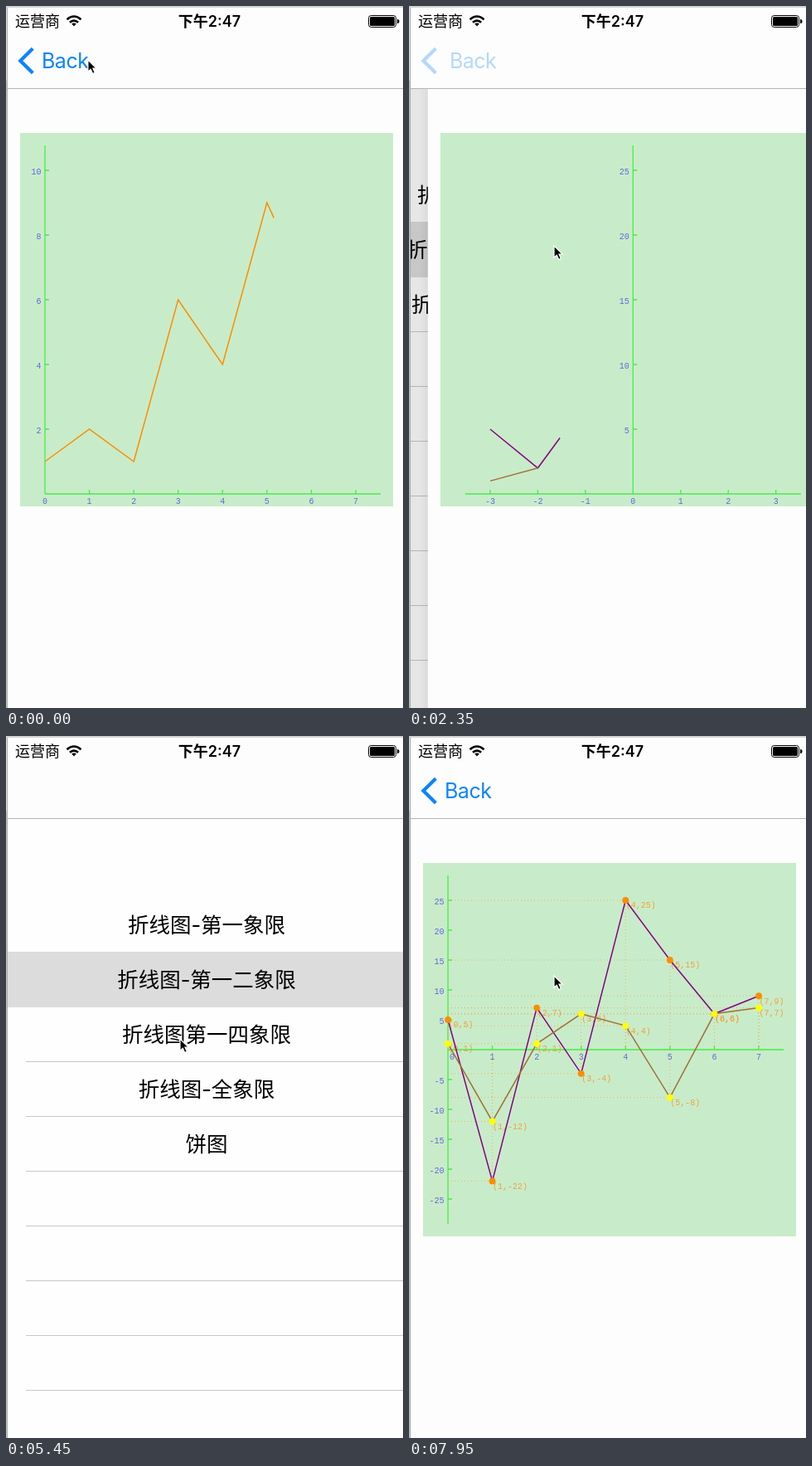
An HTML page for the animation above (8 s loop, 479x846 px).

```html
<!DOCTYPE html>
<html lang="zh-CN">
<head>
<meta charset="utf-8">
<title>Line charts</title>
<style>
html, body { margin: 0; width: 100%; height: 100%; overflow: hidden; background: #fdfdfd; }
svg { display: block; width: 100vw; height: 100vh; }
text { font-family: Inter, "Noto Sans CJK SC", "Noto Sans CJK JP", "Noto Sans CJK", sans-serif; }
.mono text { font: 10px "Liberation Mono", monospace; }
.row { font-size: 25.5px; text-anchor: middle; }
</style>
</head>
<body>
<svg id="stage" viewBox="0 0 479 846">
  <defs>
    <linearGradient id="edge"><stop offset="0" stop-opacity="0"/><stop offset="1" stop-opacity=".05"/></linearGradient>
  </defs>
  <g id="table"></g>
  <g id="page">
    <rect x="-8" y="100" width="10" height="746" fill="url(#edge)"/>
    <rect x="2" y="100" width="478" height="746" fill="#fdfdfd"/>
    <rect x="17" y="153" width="450" height="450" fill="#c8ecc9"/>
  </g>
  <rect width="479" height="99" fill="#fdfdfd"/>
  <rect x="2" y="99" width="477" height="1" fill="#b4b4b4"/>
  <g id="chevron"><path d="M32.3 51.3L17.3 66L32.3 80.7" fill="none" stroke="#0a84ff" stroke-width="4.2"/></g>
  <text id="back" x="43" y="75" font-size="25" letter-spacing="-.5" fill="#0a84ff">Back</text>
  <text x="11" y="25" font-size="18">运营商</text>
  <text x="245.5" y="25" font-size="18" font-weight="600" text-anchor="middle">下午2:47</text>
  <g fill="none" stroke="#000" stroke-width="2.6">
    <path d="M73.5 16.2Q82 8.8 90.5 16.2"/>
    <path d="M76.9 19.8Q82 15.4 87.1 19.8"/>
    <path d="M79.2 21.6Q82 19.4 84.8 21.6L82 24.6Z" fill="#000" stroke="none"/>
  </g>
  <rect x="437.5" y="11.5" width="33" height="14" rx="3" fill="none" stroke="#000"/>
  <rect x="439" y="13" width="30" height="11" rx="1.5"/>
  <path d="M472 16Q474.5 16 474.5 18.5T472 21Z"/>
  <rect width="479" height="2" fill="#d2d2d2"/>
  <rect width="2" height="90" y="2" fill="#e6e6e6"/>
  <rect x="1" y="2" width="1" height="844" fill="#a8a8a8"/>
  <rect y="90" width="1" height="756" fill="#c4c4c4"/>
  <path id="cursor" d="M0 0V14.2L3.3 11.2L5.7 16.6L8.4 15.4L6 10.2H10.4Z" stroke="#fff" stroke-width="1.2"/>
</svg>
<script>
const LOOP = 8000, DRAW = 1925, WIDTH = 478;
const NS = 'http://www.w3.org/2000/svg';
const $ = id => document.getElementById(id);

function add(parent, tag, attrs, text) {
  const el = document.createElementNS(NS, tag);
  for (const k in attrs) el.setAttribute(k, attrs[k]);
  if (text !== undefined) el.textContent = text;
  return parent.appendChild(el);
}

// Menu
const table = $('table');
add(table, 'rect', { x: 0, y: 100, width: 640, height: 746, fill: '#fefefe' });
for (let y = 260; y < 846; y += 66)
  add(table, 'rect', { x: 24, y, width: 600, height: 1, fill: '#c8c8cb' });
const picked = add(table, 'rect', { x: 0, width: 640, height: 67, fill: '#dcdcdc' });
['折线图-第一象限', '折线图-第一二象限', '折线图第一四象限', '折线图-全象限', '饼图'].forEach((name, i) =>
  add(table, 'text', { class: 'row', x: 242, y: 236.5 + 66 * i }, name));
const dim = add(table, 'rect', { x: 0, y: 100, width: 640, height: 746 });

// Charts
const ORANGE = '#ff8c00', YELLOW = '#ffff00', PURPLE = '#860086', BROWN = '#a27038';
const charts = [
  { start: -1517, ox: 47, oy: 588, ux: 375 / 7, uy: 39, from: 0, step: 2, low: 2, high: 10, label: '#e8552d',
    lines: [[ORANGE, ORANGE, [1, 2, 1, 6, 4, 9, 6, 7]]] },
  { start: 2095, ox: 249.5, oy: 588, ux: 57.45, uy: 15.6, from: -3, step: 5, low: 5, high: 25, label: '#f2a03c',
    lines: [[PURPLE, ORANGE, [5, 2, 7, 4, 25, 15, 6]], [BROWN, YELLOW, [1, 2, 1, 6, 4, 9, 6]]] },
  { start: 5680, ox: 47, oy: 378, ux: 375 / 7, uy: 7.2, from: 0, step: 5, low: -25, high: 25, label: '#f2a03c',
    lines: [[PURPLE, ORANGE, [5, -22, 7, -4, 25, 15, 6, 9]], [BROWN, YELLOW, [1, -12, 1, 6, 4, -8, 6, 7]]] }
];

function buildChart(c) {
  const g = c.el = add($('page'), 'g', { class: 'mono' });
  const px = x => c.ox + x * c.ux, py = y => c.oy - y * c.uy;
  let axes = `M${c.ox} 168V588M47 ${c.oy}H452`;
  for (let x = c.from; x <= c.from + c.lines[0][2].length - 1; x++) {
    axes += `M${px(x)} ${c.oy}v-5`;
    const shift = x === 0 && c.low < 0 ? 5 : 0;
    add(g, 'text', { x: px(x) + shift, y: c.oy + 12, 'text-anchor': 'middle', fill: '#6266e0' }, x);
  }
  for (let y = c.low; y <= c.high; y += c.step) if (y) {
    axes += `M${c.ox} ${py(y)}h5`;
    add(g, 'text', { x: c.ox - 4.5, y: py(y) + 4.7, 'text-anchor': 'end', fill: '#6266e0' }, y);
  }
  add(g, 'path', { d: axes, fill: 'none', stroke: '#45ee45', 'stroke-width': 1.3 });

  const guides = add(g, 'g', {}), strokes = add(g, 'g', {}), dots = add(g, 'g', {});
  c.marks = [guides, dots];
  c.paths = c.lines.map(([stroke, fill, values]) => {
    const pts = values.map((v, i) => [px(c.from + i), py(v)]);
    pts.forEach(([x, y], i) => {
      add(guides, 'path', { d: `M${c.ox} ${y}H${x}M${x} ${c.oy}V${y}`, fill: 'none', stroke: '#f5a040',
        'stroke-opacity': .75, 'stroke-dasharray': '1 3' });
      add(guides, 'text', { x: x + .5, y: y + 9.3, fill: c.label }, `(${c.from + i},${values[i]})`);
      add(dots, 'circle', { cx: x, cy: y, r: 3.9, fill });
    });
    return add(strokes, 'path', { d: 'M' + pts.join('L'), pathLength: 1, fill: 'none', stroke, 'stroke-width': 1.5 });
  });
}
charts.forEach(buildChart);

// Navigation: first visible time, spring start, direction
const moves = [[1210, 1180, 'pop'], [2080, 2082, 'push'], [4730, 4702, 'pop'], [5690, 5668, 'push']];
const OMEGA = Math.sqrt(1000 / 3);
function spring(ms) {
  const x = OMEGA * Math.max(0, ms) / 1000, p = 1 - (1 + x) * Math.exp(-x);
  return p > .999 ? 1 : p;
}
const clamp = v => Math.min(1, Math.max(0, v));

// Pointer: time, x, y
const pointer = [
  [0, 99, 65], [300, 70, 65], [1190, 70, 65], [1320, 82, 129], [1700, 175, 289], [3250, 175, 289],
  [3620, 113, 83], [3690, 103, 73], [3960, 66, 69], [4740, 66, 69], [5300, 210, 365], [7690, 210, 365],
  [7780, 214, 376], [7950, 175, 289], [8000, 175, 289]
];
function pointerAt(t) {
  const i = Math.max(1, pointer.findIndex(k => k[0] > t));
  const [a, b] = [pointer[i - 1], pointer[i]], u = (t - a[0]) / (b[0] - a[0]);
  return [a[1] + (b[1] - a[1]) * u, a[2] + (b[2] - a[2]) * u];
}

function render(t) {
  let off = 0, textAlpha = t >= 1030 ? .3 : 1, arrowAlpha = textAlpha;
  const move = moves.filter(m => m[0] <= t).pop();
  if (move) {
    const ms = t - move[1], p = spring(ms);
    if (move[2] === 'pop') {
      off = p;
      textAlpha = .3 * clamp(1 - ms / 280);
      arrowAlpha = .3 * clamp(1 - ms / 160);
    } else {
      off = 1 - p;
      textAlpha = arrowAlpha = clamp((ms - 190) / 260);
    }
  }
  const index = t < 2080 ? 0 : t < 5690 ? 1 : 2;
  $('page').setAttribute('transform', `translate(${off * WIDTH})`);
  $('page').style.display = off === 1 ? 'none' : '';
  table.setAttribute('transform', `translate(${-.3 * WIDTH * (1 - off)})`);
  dim.setAttribute('opacity', .1 * (1 - off));
  picked.setAttribute('y', 194 + 66 * index);

  $('back').setAttribute('x', 43 + 135 * off);
  $('back').setAttribute('opacity', textAlpha);
  $('chevron').setAttribute('opacity', arrowAlpha);

  charts.forEach((c, i) => {
    c.el.style.display = i === index ? '' : 'none';
    const p = clamp((t - c.start) / DRAW);
    c.paths.forEach(path => path.setAttribute('stroke-dasharray', p < 1 ? `${p} 2` : 'none'));
    c.marks.forEach(m => m.style.display = t >= c.start + DRAW ? '' : 'none');
  });
  $('cursor').setAttribute('transform', `translate(${pointerAt(t)})`);
}

function tick() {
  render(performance.now() % LOOP);
  requestAnimationFrame(tick);
}
tick();
</script>
</body>
</html>
```
